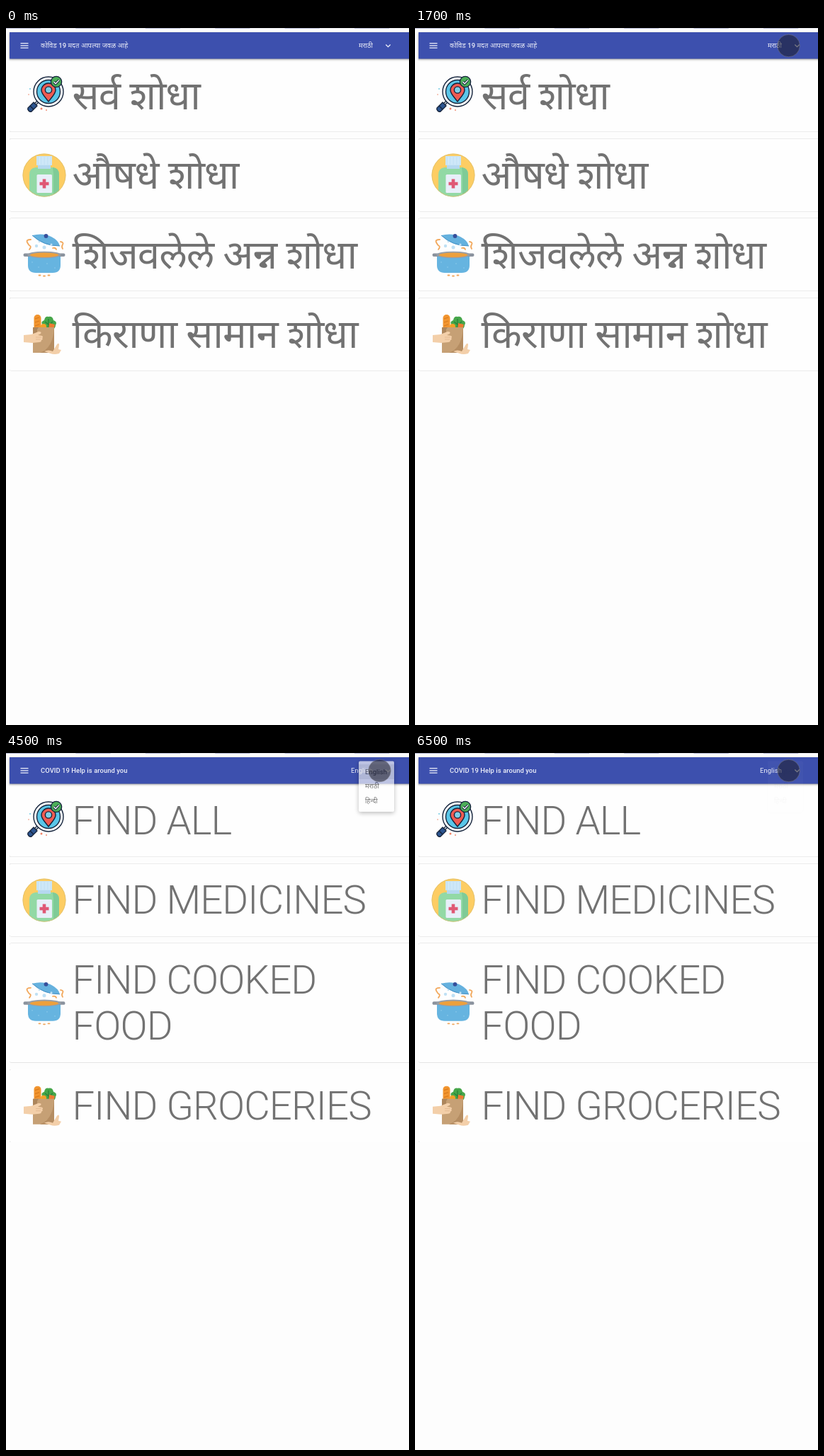
These frames come from a looping animation (569 px wide and 985 px high, 8000 ms). An HTML page:

```html
<!DOCTYPE html>
<html lang="mr">
<head>
<meta charset="utf-8">
<title>Help finder</title>
<style>
  html, body { margin: 0; width: 100%; height: 100%; overflow: hidden; background: #fdfdfd; }
  svg { display: block; width: 100%; height: 100%; }
  text { font-family: Roboto, "Noto Sans Devanagari", "Noto Sans", sans-serif; font-size: 9.39px; letter-spacing: .0094em; white-space: pre; }
  .card { fill: #fefefe; filter: drop-shadow(0 .8px .7px rgba(0,0,0,.38)); }
  .big text { font-size: 56.3px; font-weight: 300; letter-spacing: -.01562em; fill: #727272; }
  .big .mr text { font-weight: 400; }
  .bar { fill: #3d50ae; filter: drop-shadow(0 1.5px 1.5px rgba(0,0,0,.4)); }
  .bar-text text { fill: #eef0fa; }
  .bar-text .title { font-weight: 500; letter-spacing: .0075em; }
  .paper { fill: #fff; filter: drop-shadow(0 2px 3px rgba(0,0,0,.4)); }
  #menu text { fill: #333; }
</style>
</head>
<body>
<svg viewBox="0 0 569 985" preserveAspectRatio="none">
  <defs>
    <clipPath id="disc"><circle cx="54" cy="208" r="30.5"/></clipPath>
  </defs>

  <path d="M0 .5H569" stroke="#e3e3ea"/>
  <path d="M0 .5H569" stroke="#b3b5cf" stroke-dasharray="49.2"/>

  <g id="cards"></g>

  <!-- magnifier -->
  <g stroke="#16243c" stroke-width="1.4" stroke-linejoin="round">
    <path d="M46 103l-6 6" stroke-width="4"/>
    <path d="M46 103l-5 5" stroke="#dfe6ec" stroke-width="1.5"/>
    <path d="M39 105l5 5-8 8q-2 1-4-1t-1-4z" fill="#2c5590"/>
    <path d="M34 110l5 5" fill="none"/>
    <circle cx="60" cy="90" r="21" fill="#f5fafc"/>
    <circle cx="60" cy="90" r="16.500" fill="#5ac6e8"/>
    <path d="M60 104c-5-7-10-11-10-16a10 10 0 0 1 20 0c0 5-5 9-10 16z" fill="#ef5b52"/>
    <circle cx="60" cy="87.500" r="4.600" fill="#7fd0e8"/>
    <circle cx="71" cy="76" r="7.600" fill="#4cae58"/>
    <path d="M67.500 76l2.600 2.800 4.800-5.200" fill="none" stroke-width="3.400"/>
    <path d="M67.500 76l2.600 2.800 4.800-5.200" fill="none" stroke="#fff"/>
  </g>
  <g fill="#f08468">
    <circle cx="50" cy="114" r="1.500"/><circle cx="57" cy="116" r=".9"/>
    <circle cx="34" cy="86" r=".9" fill="#62c4df"/><circle cx="32" cy="94" r=".8"/>
  </g>

  <!-- medicine bottle -->
  <g clip-path="url(#disc)">
    <path d="M20 175h68v66H20z" fill="#fdcd63"/>
    <path d="M33 240v-33q0-9 9-10h24q9 1 9 10v33z" fill="#92d9a5"/>
    <path d="M66 197q9 1 9 10v33h-8v-33z" fill="#7fcb97"/>
    <path d="M43 181h22v13H43z" fill="#c8e4f6"/>
    <path d="M45 194h18v5H45z" fill="#b5d8ef"/>
    <path d="M47.500 182v11m4.500-11v11m4.500-11v11m4.500-11v11" stroke="#d6ecfa"/>
    <rect x="43.500" y="207" width="21.500" height="26" rx="1.500" fill="#e8eff9"/>
    <path d="M54 213.500v13M47.500 220h13" stroke="#df5875" stroke-width="4.600"/>
  </g>
  <circle cx="54" cy="208" r="30" fill="none" stroke="#d9bd72" stroke-width=".7"/>

  <!-- cooking pot -->
  <g id="pot">
    <path d="M37 293q15-4 27 2 10 5 12 13-23 1-39-15z" fill="#65b1de"/>
    <path d="M37 293q16 15 39 15" stroke="#4792c6" fill="none"/>
    <circle cx="56.500" cy="294" r="2.900" fill="#354f9b"/>
    <path d="M35 299q-7 0-5 4t4 5-1 5M77 302q5 1 3 4t0 6M66 311q4-1 5 2" fill="none" stroke="#f2a85c" stroke-width="1.800" stroke-linecap="round"/>
    <g fill="#bfe0f4">
      <circle cx="43" cy="308" r="2.200"/><circle cx="54" cy="310" r="2.500"/><circle cx="64" cy="306" r="1.600"/><circle cx="47" cy="302" r="1.300"/>
    </g>
    <path d="M31 321h46v14q0 11-11 11H42q-11 0-11-11z" fill="#66b4e0"/>
    <rect x="24.500" y="318.500" width="59" height="4.500" rx="2.200" fill="#8a929d"/>
    <ellipse cx="54" cy="320.500" rx="24" ry="4.800" fill="#979ea7"/>
    <ellipse cx="54" cy="320.800" rx="20" ry="3.200" fill="#eda03c"/>
    <g fill="#8ecaea">
      <circle cx="37" cy="331" r=".8"/><circle cx="46" cy="338" r=".8"/><circle cx="58" cy="333" r=".8"/><circle cx="69" cy="339" r=".8"/>
    </g>
    <path d="M46.500 349.500h2m4.500 1h2m4.500-1h2" stroke="#efa75e" stroke-width="1.800" stroke-linecap="round"/>
  </g>

  <!-- grocery bag -->
  <g id="bag">
    <rect x="39.500" y="405" width="10" height="28" rx="4.800" fill="#f2952f"/>
    <path d="M41 411l6-2m-6 7l6-2m-6 7l6-2" stroke="#d97b1d" stroke-width="1.300"/>
    <path d="M60 427q-9-3-8-7-4-5 2-7 1-6 6-5 6-1 7 5 6 2 3 7 0 5-6 7z" fill="#46a64a"/>
    <path d="M60 426v-15m0 8l-5-4m5 5l6-5" stroke="#27803a" stroke-width="1.200"/>
    <circle cx="53" cy="422" r="4" fill="#f3a129"/>
    <path d="M61 417l8 2-2 8h-7z" fill="#ee7b32"/>
    <path d="M38 423h30v36H38z" fill="#c6a075"/>
    <path d="M38 423h8l-2 3v10h-6z" fill="#ad865c"/>
    <path d="M68 424v35H48q18-6 20-35z" fill="#b58d62"/>
    <path d="M25 434l11-1 10-4q5 0 3 3l-4 2 6 1q2 2 0 3 2 2-1 3 0 3-3 3l-10 1-12-1z" fill="#f3cfa9"/>
    <path d="M42 437h8m-8 3h7" stroke="#dfb38c" stroke-width=".8"/>
    <path d="M54 457q6-3 12 0l6-10q3-3 3 1l-1 6 4 1-3 5q-7 2-12 0z" fill="#f3cfa9"/>
  </g>

  <g class="big">
    <g class="mr">
      <text x="93.500" y="114.500">सर्व शोधा</text>
      <text x="93.500" y="227">औषधे शोधा</text>
      <text x="93.500" y="339.500">शिजवलेले अन्न शोधा</text>
      <text x="93.500" y="452">किराणा सामान शोधा</text>
    </g>
    <g class="en">
      <text x="93.500" y="114.500">FIND ALL</text>
      <text x="93.500" y="227">FIND MEDICINES</text>
      <text x="93.500" y="339.500">FIND COOKED</text>
      <text x="93.500" y="405.200">FOOD</text>
      <text x="93.500" y="517.700">FIND GROCERIES</text>
    </g>
  </g>

  <rect class="bar" x="5" y="6" width="570" height="37.500"/>
  <path d="M20.500 21.700h11m-11 3.200h11m-11 3.200h11" stroke="#eef0fa" stroke-width="1.300"/>
  <path d="M536.300 23.500l3.200 3.200 3.200-3.200" fill="none" stroke="#eef0fa" stroke-width="1.300"/>
  <g class="bar-text">
    <g class="mr">
      <text class="title" x="49" y="28">कोविड 19 मदत आपल्या जवळ आहे</text>
      <text x="498" y="27.500">मराठी</text>
    </g>
    <g class="en">
      <text class="title" x="49" y="28.300">COVID 19 Help is around you</text>
      <text x="487" y="28">English</text>
    </g>
  </g>

  <g id="menu">
    <rect class="paper" x="498" y="11.500" width="50" height="71.500" rx="2"/>
    <rect id="row" x="498" width="50" height="21" fill="#ebebeb"/>
    <text x="507" y="29.500">English</text>
    <text x="507" y="50">मराठी</text>
    <text x="507" y="71">हिन्दी</text>
  </g>

  <circle id="touch" cx="527.500" cy="25" r="15.800" fill="#191924" fill-opacity=".54" stroke="#88888f" stroke-opacity=".45"/>
</svg>
<script>
  const $ = id => document.getElementById(id);
  const show = (el, on) => { el.style.display = on ? '' : 'none'; };
  const LINE = 65.7, PITCH = 112.5, TOP = 43.7, HEIGHT = 103, LOOP = 8000;

  // time, menu opacity, top of the selected row
  const steps = [[0, 0, 36], [2500, .88, 36], [4500, .66, 16], [6500, .025, 16]];

  const cards = [0, 1, 2, 3].map(i => {
    const card = document.createElementNS('http://www.w3.org/2000/svg', 'rect');
    const box = { class: 'card', x: 5, y: TOP + i * PITCH, width: 580, height: HEIGHT, rx: 2 };
    for (const key in box) card.setAttribute(key, box[key]);
    return $('cards').appendChild(card);
  });

  function draw(t) {
    const [, opacity, rowY] = steps.filter(s => s[0] <= t).pop();
    const english = t >= 4500, extra = english ? LINE : 0;
    document.querySelectorAll('.mr').forEach(el => show(el, !english));
    document.querySelectorAll('.en').forEach(el => show(el, english));
    cards[2].setAttribute('height', HEIGHT + extra);
    cards[3].setAttribute('y', TOP + 3 * PITCH + extra);
    $('pot').setAttribute('transform', `translate(0 ${extra / 2})`);
    $('bag').setAttribute('transform', `translate(0 ${extra})`);
    $('menu').style.opacity = opacity;
    $('row').setAttribute('y', rowY);
    show($('touch'), t >= 500);
  }

  const start = performance.now();
  function tick() {
    draw((performance.now() - start) % LOOP);
    requestAnimationFrame(tick);
  }
  tick();
</script>
</body>
</html>
```
